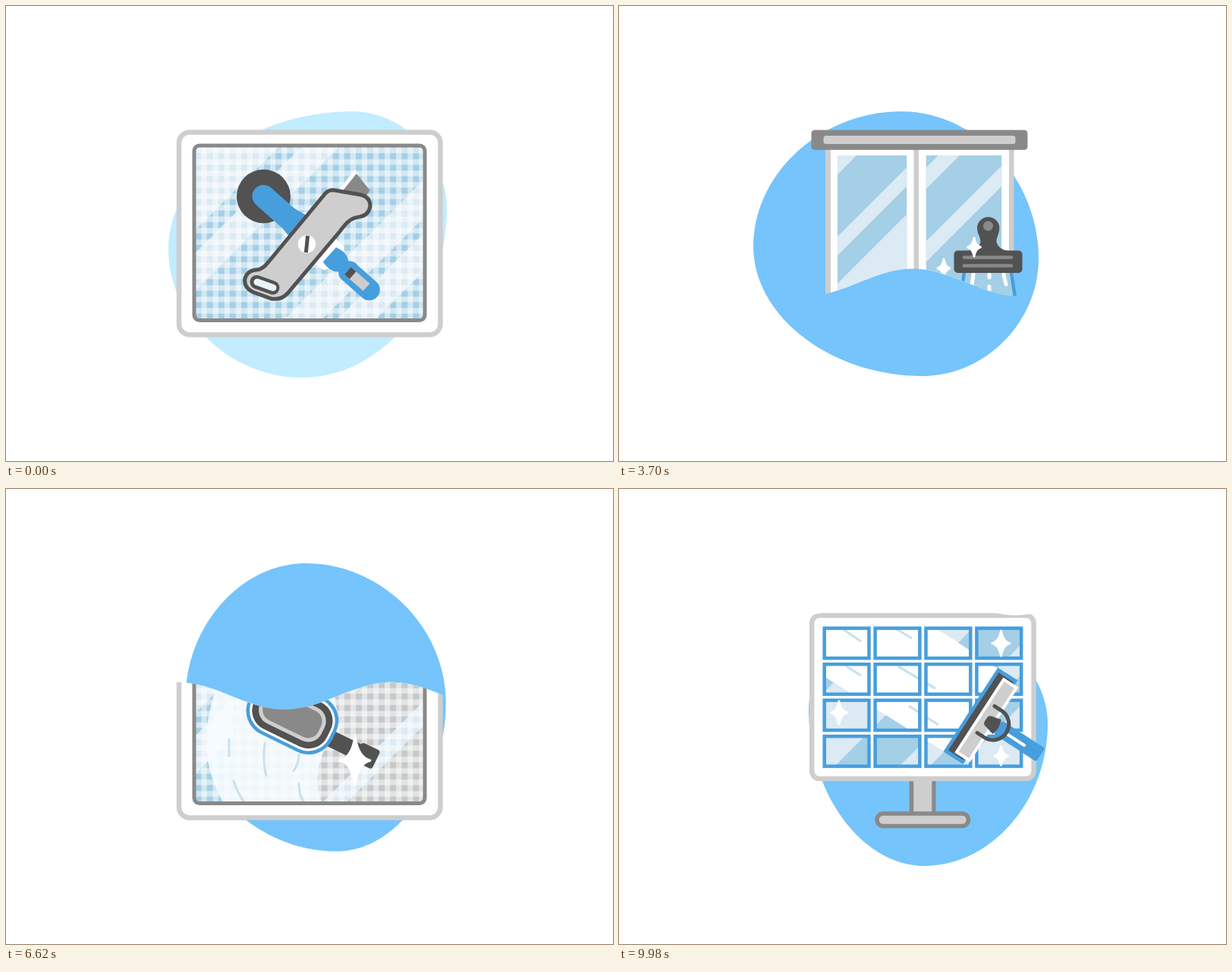
These frames come from a looping animation (800 by 600 pixels, 10000 ms). An HTML page:

```html
<!DOCTYPE html>
<html lang="en">
<head>
<meta charset="utf-8">
<title>Window cleaning</title>
<style>
html, body { margin: 0; width: 100%; height: 100%; overflow: hidden; background: #fff; }
svg { display: block; width: 100vw; height: 100vh; }
</style>
</head>
<body>
<svg id="stage" viewBox="0 0 800 600"></svg>
<script>
const LOOP = 10000, SWEEP = 900;
const BLUE = '#479edd', DARK = '#525252', GREY = '#898989', SILVER = '#cecece';
const GLASS = '#a4cfe6', SHINE = '#dbeaf3', STREAK = '#c7e1ef';

const rect = (x, y, x2, y2, fill, rx = 0, more = '') =>
  `<rect x="${x}" y="${y}" width="${x2 - x}" height="${y2 - y}" rx="${rx}" fill="${fill}" ${more}/>`;
const path = (d, fill, more = '') => `<path d="${d}" fill="${fill}" ${more}/>`;
const line = (d, color, w, cap = 'round') =>
  path(d, 'none', `stroke="${color}" stroke-width="${w}" stroke-linecap="${cap}" stroke-linejoin="round"`);
const circle = (x, y, r, fill, more = '') => `<circle cx="${x}" cy="${y}" r="${r}" fill="${fill}" ${more}/>`;
const stroke = (color, w) => `stroke="${color}" stroke-width="${w}"`;
const turned = (x, y, a, body) => `<g transform="translate(${x} ${y}) rotate(${a})">${body}</g>`;
const clipped = (id, shape, body) =>
  `<clipPath id="${id}">${shape}</clipPath><g clip-path="url(#${id})">${body}</g>`;

// Diagonal reflections; each pair bounds x + y
const shines = (...list) => list.map(([a, b]) =>
  path(`M${a - 150} 150H${b - 150}L${b - 450} 450H${a - 450}Z`, SHINE)).join('');

const star = (x, y, w, h) => {
  const k = 0.2 * w;
  return path(`M${x} ${y - h}Q${x + k} ${y - k} ${x + w} ${y}Q${x + k} ${y + k} ${x} ${y + h}` +
    `Q${x - k} ${y + k} ${x - w} ${y}Q${x - k} ${y - k} ${x} ${y - h}Z`, '#fff',
    'stroke="#fff" stroke-width="3" stroke-linejoin="round"');
};

function gingham() {
  let s = '';
  for (let x = 257.5; x < 560; x += 15.1) s += rect(x, 180, x + 7.2, 420, '#fff', 0, 'opacity=".5"');
  for (let y = 187; y < 420; y += 15.1) s += rect(245, y, 555, y + 7.2, '#fff', 0, 'opacity=".5"');
  return s;
}

const pane = (id, under, over) =>
  rect(228, 166.5, 572.5, 433.5, '#fff', 14, stroke(SILVER, 6.5)) +
  clipped(id, rect(248, 184, 552, 414.5, '#000', 6),
    rect(245, 180, 556, 420, GLASS) +
    shines([420, 545], [575, 625], [780, 830], [850, 900]) + under + gingham() + over) +
  rect(248, 184, 552, 414.5, 'none', 7, stroke(GREY, 5));

const squeegee = (x, y) => turned(x, y, 33,
  rect(-14, -72, -6, 72, DARK) +
  rect(-4, -71, 13, 71, '#fff', 0, stroke(SILVER, 3.5)) +
  line('M2 -70V70M7 -70V70', SILVER, 1.8, 'butt') +
  path('M-9 -14L4 -18L12 -10V13L4 20L-9 15Z', '#fff', stroke(SILVER, 2.5)) +
  circle(-1, -3, 3.4, '#fff', stroke(SILVER, 2)) + circle(-1, 9, 3.4, '#fff', stroke(SILVER, 2)) +
  path('M11 -4L20 -9V14L11 9Z', DARK) + rect(18, -8, 83, 14, BLUE, 3));

const header = (x, x2) =>
  rect(x, 163.5, x2, 189.8, GREY, 4.5) + rect(x + 16, 171, x2 - 16, 182, SILVER, 3.5);

function cutters() {
  const roller = turned(339.5, 251, 41.5,
    rect(52, -21, 126, 21, '#fff', 5) +
    path('M0 -15H40C52 -16 54 -20 66 -18V16C55 19 52 14 40 15H0A15 15 0 0 1 0 -15Z', BLUE) +
    path('M116 -13Q132 -18 140 -10Q146 -16 154 -14H186A14 14 0 0 1 186 14H152Q144 15 140 9Q132 17 116 13Z', BLUE) +
    rect(148, -6.5, 181, 6.5, SILVER) + rect(148, -6.5, 157, 6.5, DARK));
  return circle(339.5, 251, 35.5, DARK) + roller +
    path('M437 245L459.5 216L465 222L446 249Z', '#fff') + path('M441 247L462 221L479.5 243L473 253Z', GREY) +
    path('M421 247Q426 242 433 243L468 249Q480 252 480 264Q478 276 466 278C452 280 447 288 441 296' +
      'L371 379Q363 388 350 386L325 377Q313 371 315 359Q318 349 329 348C338 348 343 341 348 335Z', SILVER, stroke(DARK, 5)) +
    circle(396.5, 314, 11.7, '#fff') + line('M397.6 303L395.4 325', DARK, 5, 'butt') +
    line('M330.5 364L351.5 371.5', DARK, 18) + line('M331 364L352 371.5', '#e9f4fa', 9);
}

const gridPane = () => pane('paneA', '', '') + cutters();

function windshield() {
  const glass = 'M259 186H552L494 374Q493 378.5 488 378.5H328Q324 378.5 322 374Z';
  return path('M231.5 163H578L558 249L554 256L530 366Q527 366 527 369C528 380 522 384 516 386Q518 391 524 392' +
      'L515 430Q513 437 506 437H308Q301 437 299 430Z', '#8a8a8a') +
    circle(557, 251, 3.5, '#fff') +
    path('M233 166H577L509 390Q506 399 496 399H318Q307 399 304 390Z', SILVER) +
    path('M241 171H570L502 385Q500 392 493 392H319Q313 392 311 385Z', '#fff') +
    clipped('paneB', `<path d="${glass}"/>`,
      rect(230, 163, 580, 380, GLASS) + shines([500, 629], [700, 724], [765, 824]) +
      path('M200 198L440 351L530 212V160H200Z', '#fff') +
      line('M398 277L456 315M462 278L490 296M330 230L378 262', STREAK, 3, 'butt')) +
    path(glass, 'none', stroke(GREY, 4.8)) +
    squeegee(487, 293) + star(359, 338, 17, 26) + star(484, 344, 8, 10.5);
}

function slider() {
  const glass = (id, x, x2, ...s) => clipped(id, rect(x, 197, x2, 427, '#000'), rect(x, 197, x2, 427, GLASS) + shines(...s));
  return rect(272, 186, 520.5, 437, SILVER) + rect(279, 186, 388.5, 437, '#fff') + rect(395, 186, 514, 437, '#fff') +
    glass('paneC', 288, 379.5, [400, 510], [592, 617], [654, 740]) +
    glass('paneD', 404.5, 504.5, [618, 646], [715, 742]) +
    header(253.5, 538.5) +
    path('M456 350H518L530 437H440Z', GLASS) +
    line('M455 351L443 435M517 351L530 437', BLUE, 4.5) +
    line('M467 354L461 399M488 354V358M488 370V420M507 354L510 367', '#fff', 5) +
    path('M472 293A14.7 14.7 0 0 1 501.4 293C501 302 496 307 498 313Q502 322 514 323V328H459V323Q472 322 476 313C478 306 472 301 472 293Z', DARK) +
    circle(486.5, 290, 6.5, GREY) + rect(441.5, 322.5, 531.5, 352, DARK, 5) +
    line('M455 331.5H517M455 342.5H517', GREY, 4.7) +
    star(468, 318, 8.5, 12) + star(428, 346, 8, 12);
}

function steamedPane() {
  const layer = (i, color) => rect(-75 + i, -40 + i, 47 - i, 40 - i, color, 34 - i * .9);
  return pane('paneE', path('M300 180H560V420H300Z', '#c6c8ca') +
      path('M410 420L552 278V310L442 420Z', SHINE),
      path('M264 342C262 285 285 225 340 180H420L440 320Q410 345 410 385Q411 403 418 420H290Q267 382 264 342Z', '#f7fdff', 'opacity=".88"') +
      line('M294 330V352M341 335Q338 360 343 378M386 350Q386 362 379 372M300 385Q305 401 314 413M386 389Q386 405 393 413', STREAK, 3)) +
    turned(390, 305, 26, rect(40, -6, 100, 16, DARK) + rect(84, -9, 111, 18, DARK, 4) +
      layer(0, BLUE) + layer(4.5, '#fff') + layer(7.5, DARK) + layer(16, SILVER) + layer(21, GREY)) +
    star(460, 358, 20, 32);
}

function blindPane() {
  return rect(296, 186, 503.5, 437, SILVER) + rect(301.5, 186, 498, 437, '#fff') +
    clipped('paneF', rect(313.5, 202, 485.5, 421, '#000', 4),
      rect(311, 199, 488, 425, '#8c8c8c') +
      path('M380 199H458L410 252Z', SHINE) + path('M458 204L434 229L448 239Z', GLASS) +
      path('M311 199H392L483 258L400 390L311 425Z', '#fff') +
      line('M342 203L390 235M313 229L338 245M313 271L363 304M379 273L420 300M430 262L461 282', STREAK, 3.2, 'butt')) +
    rect(313.5, 202, 485.5, 421, 'none', 5, stroke(SILVER, 4.8)) +
    squeegee(452, 324) + path('M481 256L491 263L487 268L476 262Z', DARK) +
    header(281, 519) + star(457.5, 221, 7.5, 11) +
    path('M440 147Q434 150 431 157Q430 161 434 163L489 200L528 212L547 193Q550 190 547 187L541 180Z', DARK) +
    path('M442 132C462 120 495 120 515 136C540 156 544 184 537 209L530 229Z', BLUE) +
    line('M437.5 137.5L531.5 231.5', BLUE, 12) + line('M475 134Q508 133 523 160', GLASS, 4.5);
}

function solarPanel() {
  let cells = '', edges = '';
  for (let i = 0; i < 16; i++) {
    const x = 270.7 + i % 4 * 66.9, y = 183.6 + (i >> 2) * 47.5;
    cells += rect(x, y, x + 58.8, y + 39.5, '#000');
    edges += rect(x, y, x + 58.8, y + 39.5, 'none', 0, stroke(BLUE, 4.5));
  }
  const tool = turned(476, 299, 33,
    rect(-15, -66, 16, 66, BLUE) + rect(-10.5, -61, 13, 61, DARK) +
    rect(0, -57, 20, 57, SILVER, 0, stroke('#fff', 4)) +
    rect(28, -10.5, 95, 10.5, BLUE, 3) + line('M41 1H70', '#fff', 4) +
    path('M9 -3Q9 -7 14 -8L26 -11Q31 0 27 11L14 8Q9 7 9 3Z', DARK) +
    line('M9 -21H20A21 21 0 0 1 20 21H9', DARK, 5));
  return rect(383, 380, 417.5, 430, SILVER) + line('M385.5 383V428M415 383V428', GREY, 5.4, 'butt') +
    rect(340, 428, 460.5, 444.5, SILVER, 8.2, stroke(GREY, 5.5)) +
    rect(254.2, 166.8, 546.6, 382, '#fff', 10, stroke(SILVER, 6.5)) +
    clipped('paneG', cells, rect(260, 170, 540, 375, GLASS) +
      shines([538, 650], [735, 775], [815, 920]) +
      path('M262 242L436 351L507 242L417 183H262Z', '#fff') +
      line('M294 184L319 201M363 183L386 197M300 234L319 246M368 234L417 263M382 286L421 311', STREAK, 3.2, 'butt')) +
    edges + star(503.5, 203.5, 11.5, 16.5) + star(290, 295, 10.5, 15) + star(503.5, 352, 9, 12) + tool;
}

// Liquid takes each scene away and brings the next, upwards and downwards in turn
const scenes = [
  { draw: gridPane, out: 334 },
  { draw: windshield, in: 1200, out: 2197 },
  { draw: slider, in: 3064, out: 4150 },
  { draw: steamedPane, in: 5265, out: 6250 },
  { draw: blindPane, in: 7138, out: 8100 },
  { draw: solarPanel, in: 9091 }
];

// Blob poses: time, then its left, top, right and bottom points
const poses = [
  [0, 214, 320, 456, 139, 581, 268, 390, 490],
  [840, 246, 333, 490, 146, 608, 283, 382, 502],
  [2540, 190, 325, 390, 144, 537, 264, 335, 433],
  [3700, 177, 317, 372, 139, 553, 333, 400, 488],
  [5640, 246, 250, 375, 103, 560, 315, 397, 494],
  [7580, 227, 305, 415, 93, 599, 250, 473, 462],
  [9980, 250, 290, 400, 170, 565, 310, 403, 497]
];
const tints = [[0, 194, 236, 255], [840, 107, 180, 227], [2540, 93, 176, 235], [3700, 117, 196, 252]];
// Each drop arcs from a to b, pulled towards c
const drops = [
  { from: 560, to: 1400, a: [50, 100], c: [156, 12], b: [330, 190] },
  { from: 3950, to: 5560, a: [750, 185], c: [690, -90], b: [480, 200] },
  { from: 7600, to: 9750, a: [470, 425], c: [830, 670], b: [480, 420] }
];

function mix(keys, t) {
  let i = 1;
  while (i < keys.length - 1 && keys[i][0] < t) i++;
  const a = keys[i - 1], b = keys[i], k = Math.min(1, (t - a[0]) / (b[0] - a[0]));
  return a.slice(1).map((v, n) => v + (b[n + 1] - v) * k);
}

// Closed curve through its four outermost points
function blobPath([lx, ly, tx, ty, rx, ry, bx, by]) {
  const k = 0.54, to = (a, b) => a + (b - a) * k;
  return `M${lx} ${ly}C${lx} ${to(ly, ty)} ${to(tx, lx)} ${ty} ${tx} ${ty}` +
    `C${to(tx, rx)} ${ty} ${rx} ${to(ry, ty)} ${rx} ${ry}` +
    `C${rx} ${to(ry, by)} ${to(bx, rx)} ${by} ${bx} ${by}` +
    `C${to(bx, lx)} ${by} ${lx} ${to(ly, by)} ${lx} ${ly}Z`;
}

function dropPath({ from, to, a, b, c }, t) {
  const k = (t - from) / (to - from);
  if (k <= 0 || k >= 1) return '';
  const [x, y] = a.map((v, n) => v * (1 - k) ** 2 + 2 * c[n] * k * (1 - k) + b[n] * k * k);
  const r = 31 * Math.sin(Math.PI * k) ** 0.4;
  return blobPath([x - r, y - r * .1, x, y - r * .95, x + r, y, x + r * .1, y + r * .95]);
}

function sweepPath(k, up, above) {
  const mid = up ? 455 - 310 * k : 145 + 310 * k;
  const crest = up ? 440 - 60 * k * k : 570 - 365 * k * k;
  let d = '';
  for (let x = 150; x <= 650; x += 5)
    d += `${d ? 'L' : 'M'}${x} ${(mid - 18 * Math.cos((x - crest) * Math.PI / 141)).toFixed(2)}`;
  return d + (above ? 'V0H150Z' : 'V600H150Z');
}

const stage = document.getElementById('stage');
stage.innerHTML = '<g id="liquid"><path id="blob"/><path id="drops"/></g>' +
  scenes.map((s, i) => `<clipPath id="cut${i}"><path id="wave${i}"/></clipPath>` +
    `<g id="scene${i}">${s.draw()}</g>`).join('');
const el = id => document.getElementById(id);

function render(t) {
  el('liquid').setAttribute('fill', `rgb(${mix(tints, t).map(Math.round)})`);
  el('blob').setAttribute('d', blobPath(mix(poses, t)));
  el('drops').setAttribute('d', drops.map(d => dropPath(d, t)).join(''));
  scenes.forEach((s, i) => {
    const g = el('scene' + i), start = s.in ?? -SWEEP, end = s.out ?? LOOP;
    const hidden = t < start || t > end + SWEEP;
    g.style.display = hidden ? 'none' : '';
    if (hidden) return;
    const entering = t < start + SWEEP;
    if (!entering && t < end) return g.removeAttribute('clip-path');
    const up = (entering ? i - 1 : i) % 2 === 0;
    const k = (t - (entering ? start : end)) / SWEEP;
    el('wave' + i).setAttribute('d', sweepPath(k, up, entering !== up));
    g.setAttribute('clip-path', `url(#cut${i})`);
  });
}

const begin = performance.now();
function tick() {
  render((performance.now() - begin) % LOOP);
  requestAnimationFrame(tick);
}
render(0);
requestAnimationFrame(tick);
</script>
</body>
</html>
```
